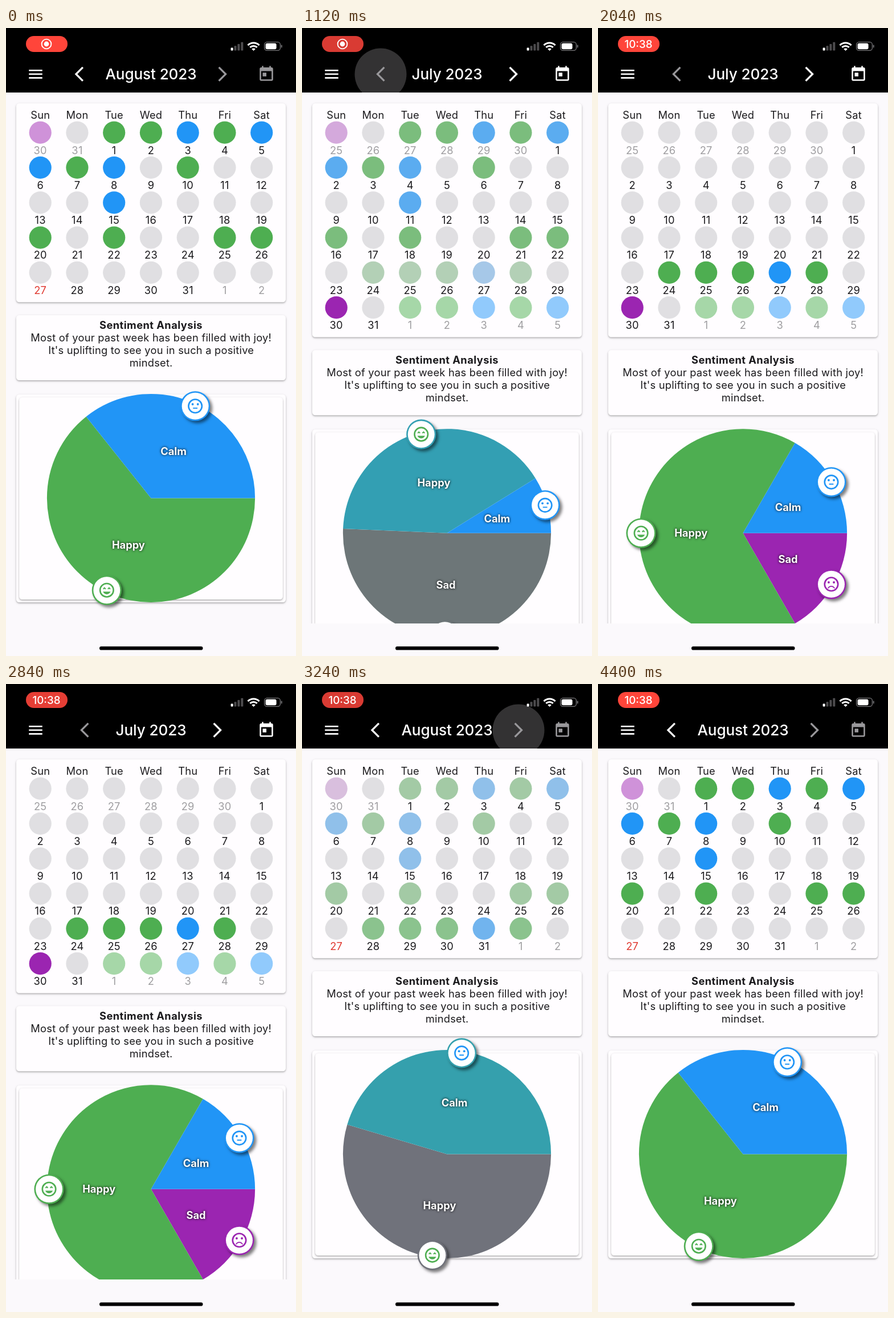
These frames come from a looping animation (509x1100 px, 4480 ms). An HTML page with a canvas:

```html
<!DOCTYPE html>
<html lang="en">
<head>
<meta charset="utf-8">
<title>Mood calendar</title>
<style>
html, body { margin: 0; width: 100%; height: 100%; overflow: hidden; background: #fbf9fc; }
canvas { display: block; width: 509px; height: 1100px; }
</style>
</head>
<body>
<canvas id="stage" width="509" height="1100"></canvas>
<script>
const ctx = document.getElementById('stage').getContext('2d');
const LOOP = 4480, TO_JULY = 1060, TO_AUGUST = 3157;
const PIE_MS = 150, DAY_MS = 200;
const U = 1.305;                 // stage pixels per layout unit
const ROW = 61.3, COL = 64.75;
const GREEN = '#4eae51', BLUE = '#2195f6', PURPLE = '#9b25b1';
const INK = '#1b1a1d', FADED = '#9f9ea1', DIM = '#99989b';

const DAY_COLORS = {
  '.': '#e0dfe2', g: GREEN, b: BLUE, p: PURPLE,
  h: '#a6d7a8', c: '#91cafc', l: '#cf92d9'
};
const MOODS = {
  Happy: { color: GREEN, face: 'M13 9.94 14.06 11l1.06-1.06L16.18 11l1.06-1.06-2.12-2.12zM8.88 9.94 9.94 11 11 9.94 8.88 7.82 6.76 9.94 7.82 11zM12 17.5c2.33 0 4.31-1.46 5.11-3.5H6.89c.8 2.04 2.78 3.5 5.11 3.5z' },
  Calm: { color: BLUE, eyes: true, face: 'M9 14h6v1.5H9z' },
  Sad: { color: PURPLE, eyes: true, face: 'M12 14c-2.33 0-4.32 1.45-5.12 3.5h1.67c.69-1.19 1.97-2 3.45-2s2.75.81 3.45 2h1.67c-.8-2.05-2.79-3.5-5.12-3.5z' }
};
for (const m of Object.values(MOODS)) m.path = new Path2D(m.face);

const ICONS = {
  menu: new Path2D('M3 6h18v2H3zM3 11h18v2H3zM3 16h18v2H3z'),
  back: new Path2D('M17.77 3.77 16 2 6 12l10 10 1.77-1.77L9.54 12z'),
  next: new Path2D('M6.23 20.23 8 22l10-10L8 2 6.23 3.77 14.46 12z'),
  today: new Path2D('M19 3h-1V1h-2v2H8V1H6v2H5c-1.11 0-1.99.9-1.99 2L3 19c0 1.1.89 2 2 2h14c1.1 0 2-.9 2-2V5c0-1.1-.9-2-2-2zm0 16H5V8h14zM7 10h5v5H7z')
};

const AUGUST = {
  title: 'August 2023', first: 30, prevLength: 31, today: 27,
  marks: 'l.ggbgb' + 'bgb.g..' + '..b....' + 'g.g..gg' + '.......',
  pie: [['Happy', 9], ['Calm', 5]],
  backX: 128.5, nextX: 380, backOn: true, nextOn: false
};
const JULY = {
  title: 'July 2023', first: 25, prevLength: 30, today: 0,
  marks: '.'.repeat(28) + '.gggbg.' + 'p.hhchc',
  pie: [['Sad', 1], ['Happy', 4], ['Calm', 1]],
  backX: 138, nextX: 371, backOn: false, nextOn: true
};

const clamp = v => Math.max(0, Math.min(1, v));
const lerp = (a, b, p) => a + (b - a) * p;
const rgb = hex => [1, 3, 5].map(i => parseInt(hex.slice(i, i + 2), 16));

function mix(a, b, p) {
  const end = rgb(b);
  return `rgb(${rgb(a).map((v, i) => Math.round(lerp(v, end[i], p)))})`;
}

// Piecewise linear value through [time, value] points.
function track(points, t) {
  if (t <= points[0][0]) return points[0][1];
  for (let i = 1; i < points.length; i++) {
    const [t0, v0] = points[i - 1], [t1, v1] = points[i];
    if (t < t1) return lerp(v0, v1, (t - t0) / (t1 - t0));
  }
  return points[points.length - 1][1];
}

function disc(x, y, r, fill) {
  ctx.fillStyle = fill;
  ctx.beginPath();
  ctx.arc(x, y, r, 0, Math.PI * 2);
  ctx.fill();
}

function box(x, y, w, h, r, fill) {
  ctx.fillStyle = fill;
  ctx.beginPath();
  ctx.roundRect(x, y, w, h, r);
  ctx.fill();
}

function shadow(alpha, blur, dx, dy) {
  ctx.shadowColor = `rgba(0,0,0,${alpha})`;
  ctx.shadowBlur = blur;
  ctx.shadowOffsetX = dx;
  ctx.shadowOffsetY = dy;
}

function text(str, x, y, fill = INK, { size = 18.27, weight = 400, gap = 0.24 } = {}) {
  ctx.font = `${weight} ${size}px Inter, sans-serif`;
  ctx.letterSpacing = gap + 'px';
  ctx.textAlign = 'center';
  ctx.fillStyle = fill;
  ctx.fillText(str, x, y);
}

function icon(path, x, y, fill) {
  ctx.save();
  ctx.translate(x, y);
  ctx.scale(U, U);
  ctx.translate(-12, -12);
  ctx.fillStyle = fill;
  ctx.fill(path);
  ctx.restore();
}

function card(x, y, w, h) {
  for (const [alpha, blur] of [[0.12, 5], [0.24, 2.4]]) {
    ctx.save();
    shadow(alpha, blur, 0, 1.4);
    box(x, y, w, h, 5.2, '#fffdff');
    ctx.restore();
  }
}

function statusBar(t) {
  const glow = 0.5 + 0.5 * Math.cos(t / 2150 * Math.PI * 2);
  box(35, 14, 73, 28, 14, mix('#d93b33', '#ff453a', clamp(glow * 1.15)));
  const clock = clamp((t - 1200) / 300);
  ctx.save();
  ctx.globalAlpha = 1 - clock;
  ctx.strokeStyle = '#fff';
  ctx.lineWidth = 1.9;
  ctx.beginPath();
  ctx.arc(71, 28, 8.4, 0, Math.PI * 2);
  ctx.stroke();
  disc(71, 28, 4.4, '#fff');
  ctx.globalAlpha = clock;
  text('10:38', 71, 35, '#fff', { size: 18.8, weight: 500, gap: 0 });
  ctx.restore();

  for (let i = 0; i < 4; i++) {
    const h = 5.2 + i * 3.2;
    box(394.6 + i * 5.9, 39.6 - h, 4, h, 1, i ? '#4d4c4e' : '#fff');
  }

  ctx.save();
  ctx.beginPath();
  ctx.moveTo(434.5, 40);
  ctx.arc(434.5, 40, 20, -Math.PI * 0.755, -Math.PI * 0.245);
  ctx.clip();
  ctx.strokeStyle = '#fff';
  ctx.lineWidth = 3;
  for (const r of [8.6, 14]) {
    ctx.beginPath();
    ctx.arc(434.5, 40, r, Math.PI, 0);
    ctx.stroke();
  }
  disc(434.5, 40, 4.6, '#fff');
  ctx.restore();

  ctx.strokeStyle = '#78777a';
  ctx.lineWidth = 1.3;
  ctx.beginPath();
  ctx.roundRect(453.6, 24.7, 27.8, 14.6, 4.6);
  ctx.stroke();
  box(455.6, 26.7, 19, 10.6, 2.8, '#fff');
  box(482.8, 29.5, 1.8, 5, 1, '#78777a');
}

function ripple(x, dt) {
  const a = track([[-60, 0], [-20, 0.08], [40, 0.2], [85, 0.2], [180, 0.035], [220, 0]], dt);
  if (a) disc(x, 81, 45.5, `rgba(255,250,255,${a})`);
}

function header(month, t) {
  ctx.save();
  ctx.beginPath();
  ctx.rect(0, 0, 509, 113);
  ctx.clip();
  ctx.fillStyle = '#000';
  ctx.fillRect(0, 0, 509, 113);
  ripple(month.backX, t - TO_JULY);
  ripple(month.nextX, t - TO_AUGUST);
  icon(ICONS.menu, 52, 80.8, '#fff');
  icon(ICONS.back, month.backX, 80.8, month.backOn ? '#fff' : DIM);
  icon(ICONS.next, month.nextX, 80.8, month.nextOn ? '#fff' : DIM);
  icon(ICONS.today, 457, 80.8, month.nextOn ? '#fff' : DIM);
  text(month.title, 254.5, 90, '#fff', { size: 26.1, weight: 500, gap: -0.1 });
  statusBar(t);
  ctx.restore();
}

function calendar(month, old, p) {
  const rows = month.marks.length / 7;
  card(18, 132, 473, 41.8 + rows * ROW);
  ['Sun', 'Mon', 'Tue', 'Wed', 'Thu', 'Fri', 'Sat'].forEach((d, i) => text(d, 60.2 + i * COL, 159));
  const lead = month.prevLength - month.first + 1;
  [...month.marks].forEach((mark, i) => {
    const x = 60.2 + i % 7 * COL, y = 183.2 + Math.floor(i / 7) * ROW;
    disc(x, y, 19.6, mix(DAY_COLORS[old.marks[i] || mark], DAY_COLORS[mark], p));
    const n = i - lead + 1;
    const inside = n > 0 && n <= 31;
    const label = n <= 0 ? n + month.prevLength : inside ? n : n - 31;
    const fill = !inside ? FADED : n === month.today ? '#e03a32' : INK;
    text(label, x, y + 37.3, fill);
  });
}

function sentiment(dy) {
  card(18, 503 + dy, 473, 114);
  text('Sentiment Analysis', 254.5, 526.6 + dy, INK, { weight: 700, gap: 0.45 });
  ['Most of your past week has been filled with joy!',
   "It's uplifting to see you in such a positive",
   'mindset.'].forEach((line, i) => text(line, 254.7, 548.7 + i * 22.1 + dy, INK));
}

function badge(x, y, border, mood) {
  ctx.save();
  shadow(0.5, 5.6, 3.9, 3.9);
  disc(x, y, 26.1, border);
  ctx.restore();
  disc(x, y, 23.5, '#fff');
  icon(mood.path, x, y, mood.color);
  ctx.strokeStyle = mood.color;
  ctx.lineWidth = 2 * U;
  ctx.beginPath();
  ctx.arc(x, y, 9 * U, 0, Math.PI * 2);
  ctx.stroke();
  if (mood.eyes) {
    for (const side of [-3.5, 3.5]) disc(x + side * U, y - 2.5 * U, 1.5 * U, mood.color);
  }
}

function pie(month, old, p, dy) {
  card(18, 642 + dy, 473, 364);
  card(23.2, 647 + dy, 462.6, 354);
  const cx = 254.5, cy = 823.5 + dy, r = 182.6;
  const parts = month.pie.map(([name, value], i) => {
    const [oldName, oldValue] = old.pie[i] || [name, value];
    return {
      name,
      value: lerp(oldValue, value, p),
      color: mix(MOODS[oldName].color, MOODS[name].color, p)
    };
  });
  const total = parts.reduce((sum, s) => sum + s.value, 0);
  let angle = 0;
  for (const s of parts) {
    const sweep = s.value / total * Math.PI * 2;
    ctx.fillStyle = s.color;
    ctx.beginPath();
    ctx.moveTo(cx, cy);
    ctx.arc(cx, cy, r, angle, angle + sweep);
    ctx.fill();
    s.dx = Math.cos(angle + sweep / 2) * r;
    s.dy = Math.sin(angle + sweep / 2) * r;
    angle += sweep;
  }
  for (const s of parts) {
    ctx.save();
    shadow(1, 4, 0, 0);
    text(s.name, cx + s.dx / 2, cy + s.dy / 2 + 6.4, '#fff', { weight: 700, gap: 0 });
    ctx.restore();
  }
  for (const s of parts) badge(cx + s.dx * 0.98, cy + s.dy * 0.98, s.color, MOODS[s.name]);
}

function draw(t) {
  const inJuly = t >= TO_JULY && t < TO_AUGUST;
  const month = inJuly ? JULY : AUGUST;
  const old = inJuly ? AUGUST : JULY;
  const since = t < TO_JULY ? LOOP : t - (inJuly ? TO_JULY : TO_AUGUST);
  const dy = inJuly ? ROW : 0;

  ctx.fillStyle = '#fbf9fc';
  ctx.fillRect(0, 0, 509, 1100);
  ctx.save();
  ctx.beginPath();
  ctx.rect(0, 113, 509, 930);
  ctx.clip();
  calendar(month, old, clamp(since / DAY_MS));
  sentiment(dy);
  pie(month, old, clamp(since / PIE_MS), dy);
  ctx.restore();
  header(month, t);
  box(164, 1083.3, 181.5, 6.2, 3.1, '#000');
}

function tick() {
  draw(performance.now() % LOOP);
  requestAnimationFrame(tick);
}
tick();
</script>
</body>
</html>
```
